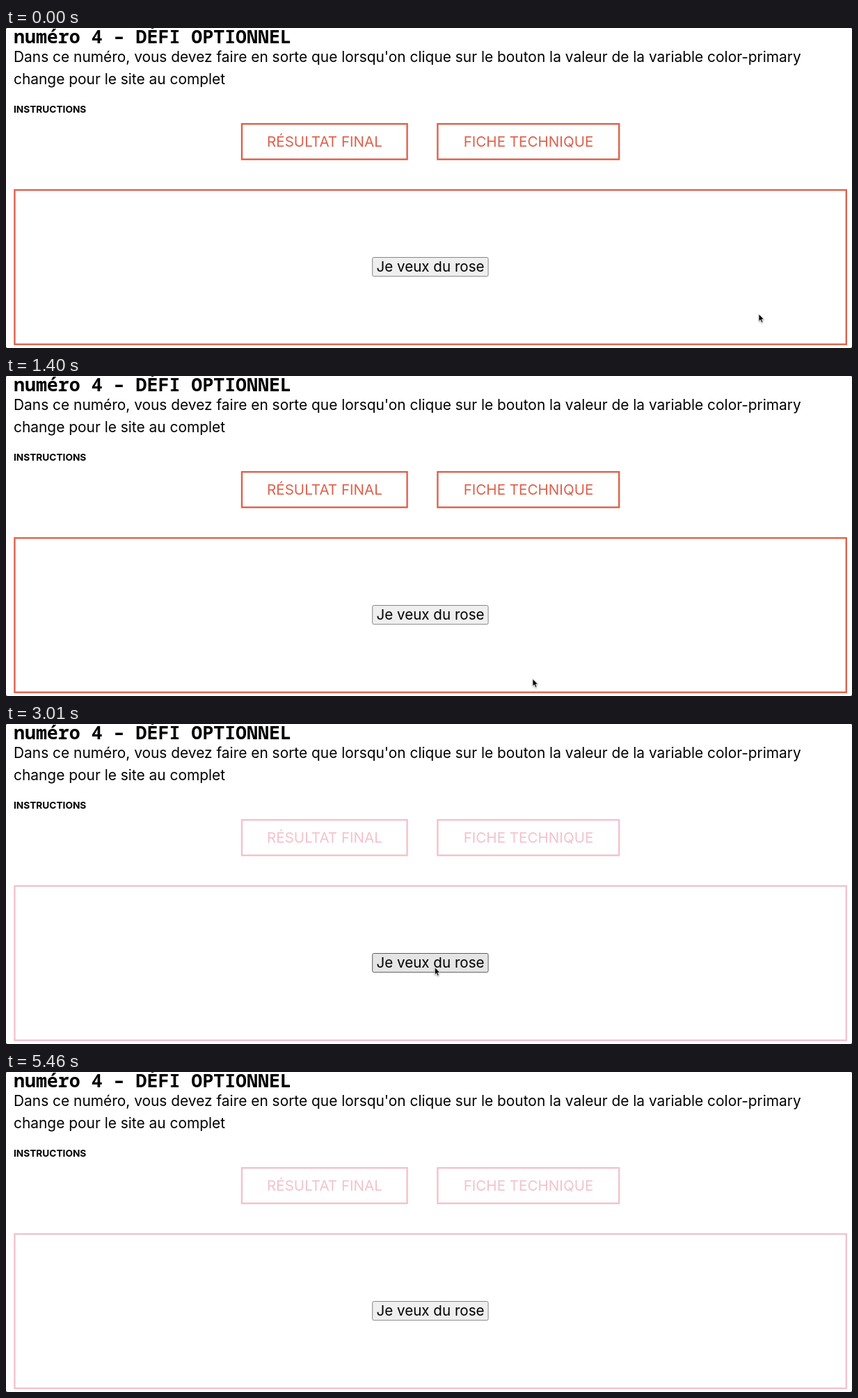
An HTML page that plays this animation: 1216 px wide and 461 px high, repeating every 5.95 s.

```html
<!DOCTYPE html>
<html lang="fr">
<head>
<meta charset="utf-8">
<style>
  html, body { margin: 0; width: 100%; height: 100%; overflow: hidden; background: #fff; }
  svg { display: block; width: 1216px; height: 461px; --primary: #de614b; }
  text { font: 20.6px Inter, sans-serif; font-optical-sizing: none; white-space: pre; }
  .title { font: 700 26.6px "Noto Sans Mono", monospace; }
  .body { font-size: 20.9px; }
  .label { font-size: 13.7px; font-weight: 700; }
  .mid { text-anchor: middle; }
  .link { fill: var(--primary); }
  .frame { fill: none; stroke: var(--primary); stroke-width: 2.4; }
  #button { fill: #efefef; stroke: #858585; }
  #button.hover { fill: #e5e5e5; stroke: #5c5c5c; }
  #button.active { fill: #f5f5f5; stroke: #a0a0a0; }
  #cursor { filter: drop-shadow(0 1px 1px #0005); }
</style>
</head>
<body>
<svg id="stage" viewBox="0 0 1216 461">
  <text class="title" x="11" y="22">numéro 4 – DÉFI OPTIONNEL</text>
  <text class="body" x="11" y="49">Dans ce numéro, vous devez faire en sorte que lorsqu'on clique sur le bouton la valeur de la variable color-primary</text>
  <text class="body" x="11" y="81">change pour le site au complet</text>
  <text class="label" x="11" y="121.5">INSTRUCTIONS</text>

  <rect class="frame" x="339" y="138.2" width="237.6" height="51"/>
  <text class="link mid" x="458" y="170.5">RÉSULTAT FINAL</text>
  <rect class="frame" x="620.4" y="138.2" width="260.8" height="51"/>
  <text class="link mid" x="751" y="170.5">FICHE TECHNIQUE</text>
  <rect class="frame" x="12.4" y="233.4" width="1195.4" height="222.3"/>

  <rect id="button" x="526.7" y="330.5" width="166.4" height="27.2" rx="2"/>
  <text class="mid" x="610" y="351">Je veux du rose</text>

  <path fill="#777" d="M0 459V461H2ZM1216 459V461H1214ZM0 0H1.5L0 1.5ZM1216 0V1.5L1214.5 0Z"/>
  <path id="cursor" stroke="#fff" stroke-width=".8" d="M0 0V10.8L2.4 8.5 4.1 12.4 6 11.6 4.4 7.8H7.6Z"/>
</svg>
<script>
const LOOP = 5950, STEP = 70;
const stage = document.getElementById("stage");
const button = document.getElementById("button");
const cursor = document.getElementById("cursor");

// Each trip: the time the pointer leaves view, then [time, x, y] stops.
const trips = [
  { end: 420, stops: [[0, 1082, 412], [140, 1106, 409], [350, 1202, 394]] },
  { end: 5460, stops: [
    [980, 1201, 412], [1190, 1000, 425], [1470, 676, 440], [1680, 627, 385], [1890, 616.3, 350.5],
    [5110, 616.3, 350.5], [5250, 622, 376], [5390, 632, 440]
  ] }
];

function pointerAt(t) {
  const trip = trips.find(({ end, stops }) => t >= stops[0][0] && t < end);
  if (!trip) return null;
  const i = trip.stops.findIndex(stop => stop[0] > t);
  if (i < 0) return trip.stops.at(-1).slice(1);
  const [t0, x0, y0] = trip.stops[i - 1], [t1, x1, y1] = trip.stops[i];
  const k = (t - t0) / (t1 - t0);
  return [x0 + (x1 - x0) * k, y0 + (y1 - y0) * k];
}

function draw(now) {
  const t = Math.floor((now % LOOP) / STEP) * STEP;
  const p = pointerAt(t);
  const over = p && p[0] > 526 && p[0] < 694 && p[1] > 330 && p[1] < 358;
  const pressed = t >= 2800 && t < 3010;

  cursor.style.display = p ? "" : "none";
  if (p) cursor.setAttribute("transform", `translate(${p})`);
  button.setAttribute("class", pressed ? "active" : over ? "hover" : "");
  stage.style.setProperty("--primary", t < 3010 ? "#de614b" : "#f3c2cc");
}

const start = performance.now();
function tick() {
  draw(performance.now() - start);
  requestAnimationFrame(tick);
}
tick();
</script>
</body>
</html>
```
